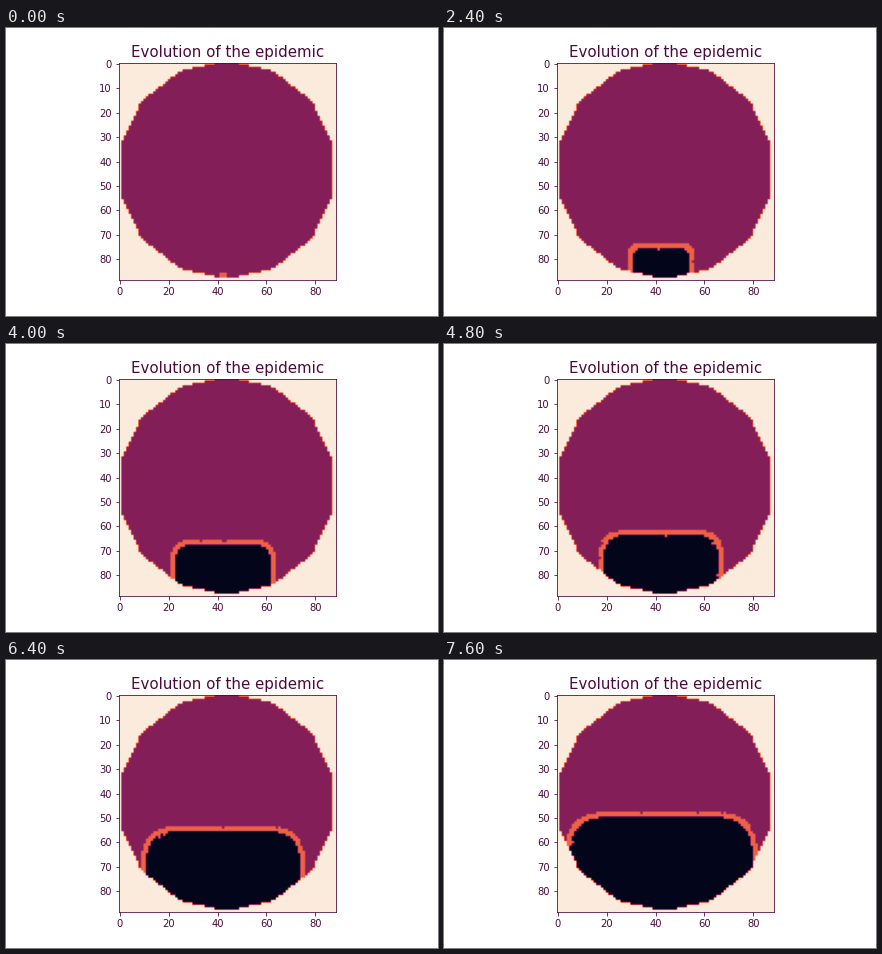
These frames come from a looping animation (432x288 px, 7800 ms). A matplotlib script:

```python
import numpy as np
import matplotlib.pyplot as plt
from matplotlib.animation import FuncAnimation
from matplotlib.colors import LinearSegmentedColormap

SIZE = 89
FRAMES, INTERVAL = 39, 200
DEAD, HEALTHY, SICK, OUTSIDE = range(4)
SICK_STEPS = 2
INK = "#4a0a3c"

cmap = LinearSegmentedColormap.from_list(
    "epidemic", ["#03051a", "#841e5a", "#f06043", "#faebdd"])

row, col = np.mgrid[:SIZE, :SIZE]


def island(sides=14, center=43.5, apothem=43.49):
    """Cells inside a regular polygon with upright left and right sides."""
    inside = np.ones((SIZE, SIZE), bool)
    for angle in 2 * np.pi * np.arange(sides) / sides:
        reach = (col - center) * np.cos(angle) + (row - center) * np.sin(angle)
        inside &= reach <= apothem
    return inside


def infection_times(x=42, y=87, power=5.5, late_share=0.02):
    """Step at which each cell falls sick: a rounded square front, some late."""
    dx = np.maximum(np.abs(col - x) - 1, 0)
    dy = np.maximum(np.abs(row - y) - 1, 0)
    distance = (dx ** power + dy ** power) ** (1 / power)
    late = np.random.default_rng(4).random(distance.shape) < late_share
    return np.ceil(distance - 0.8) + late


INHABITED = island()
TIMES = infection_times()


def state(step):
    age = step - TIMES
    grid = np.where(age < 0, HEALTHY, np.where(age < SICK_STEPS, SICK, DEAD))
    return np.where(INHABITED, grid, OUTSIDE).astype(float)


plt.rcParams.update({"font.family": "DejaVu Sans", "font.size": 10,
                     "axes.edgecolor": INK, "xtick.color": INK,
                     "ytick.color": INK})
fig, ax = plt.subplots(figsize=(6, 4), dpi=72, facecolor="white")
fig.subplots_adjust(left=0.125, right=0.9, bottom=0.125, top=0.88)
image = ax.imshow(state(0), cmap=cmap, vmin=DEAD, vmax=OUTSIDE,
                  interpolation="hanning", interpolation_stage="data")
ax.set_title("Evolution of the epidemic", fontsize=15, color=INK)
ax.set_xticks(range(0, SIZE, 20))
ax.set_yticks(range(0, SIZE, 10))


def update(step):
    image.set_data(state(step))
    return image,


anim = FuncAnimation(fig, update, frames=FRAMES, interval=INTERVAL,
                     repeat=True, repeat_delay=0)
plt.show()
```
